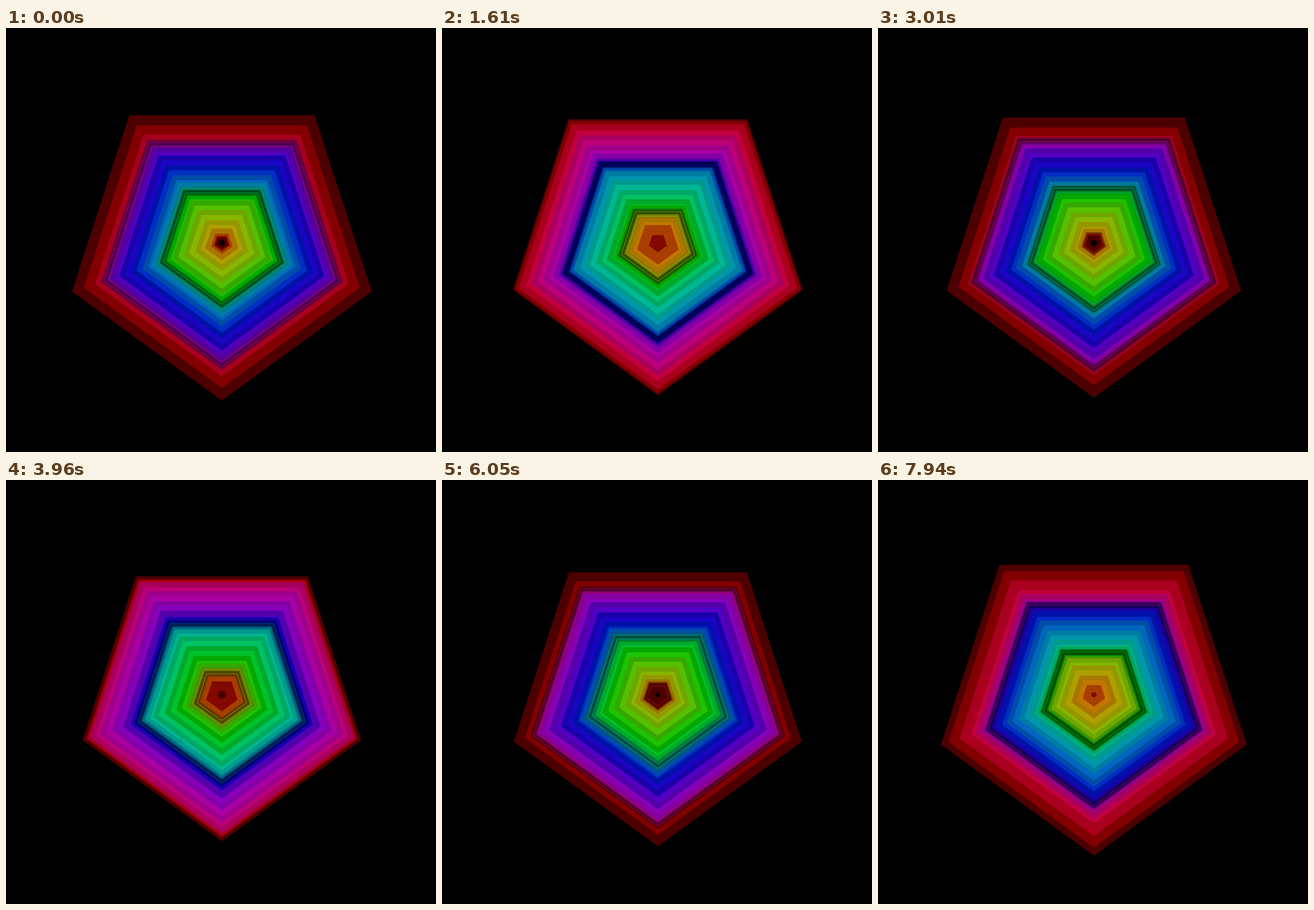
An HTML page with a canvas that plays this animation: 754x743 px, repeating every 8000 ms.

```html
<!DOCTYPE html>
<html lang="en">
<head>
<meta charset="utf-8">
<title>Pentagon wave</title>
<style>
  html, body { margin: 0; width: 100%; height: 100%; overflow: hidden; background: #000; }
  canvas { display: block; }
</style>
</head>
<body>
<canvas id="stage" width="754" height="743"></canvas>
<script>
const ctx = document.getElementById('stage').getContext('2d');
const LOOP = 8000, CX = 378.5, CY = 376.4;
const RINGS = 20, GAP = 12.5, ALPHA = 0.3;
const HALF = 15.5, SWING = 10.5;            // half line width and its swing
const START = 57, SPEED = 0.1273, LAG = 43.3; // degrees, degrees per ms, degrees per ring
const RAD = Math.PI / 180, APOTHEM = Math.cos(36 * RAD);

// [start in ms, number of even steps until the next start]
const PACE = [[0, 1], [90, 1], [240, 7], [1060, 5], [1610, 3], [1960, 7], [2780, 2],
  [3010, 5], [3600, 8], [4520, 3], [4870, 4], [5340, 6], [6050, 1], [6170, 7],
  [6990, 7], [7820, 1], [7940, 1], [LOOP, 1]];

const steps = PACE.slice(0, -1).flatMap(([from, n], i) =>
  Array.from({ length: n }, (_, k) => from + (PACE[i + 1][0] - from) * k / n));

function hueColor(hue) {
  return [0, 240, 120].map(shift => {
    const d = Math.abs((hue + shift + 180) % 360 - 180);
    return 255 * Math.min(1, Math.max(0, 2 - d / 60));
  });
}

const rings = Array.from({ length: RINGS }, (_, i) => ({
  mid: (i + 1) * GAP * APOTHEM,
  lead: (RINGS - 1 - i) * LAG,
  color: hueColor(360 * i / (RINGS - 1))
}));

// Weak channels fade out, strong ones stay
const tone = v => Math.round(v < 76 ? Math.max(0, (v - 18) * 76 / 58) : v);

function pentagon(apothem, fill) {
  const r = apothem / APOTHEM;
  ctx.beginPath();
  for (let k = 0; k < 5; k++) {
    const a = (90 + 72 * k) * RAD;
    ctx.lineTo(CX + r * Math.cos(a), CY + r * Math.sin(a));
  }
  ctx.closePath();
  ctx.fillStyle = fill;
  ctx.fill();
}

function draw(t) {
  const bands = rings.map(({ mid, lead, color }) => {
    const half = HALF + SWING * Math.cos((START + SPEED * t + lead) * RAD);
    return { inner: mid - half, outer: mid + half, color };
  });
  const edges = bands.flatMap(b => [b.inner, b.outer])
    .filter(e => e > 0).sort((a, b) => b - a);

  ctx.fillStyle = '#000';
  ctx.fillRect(0, 0, 754, 743);
  edges.forEach((edge, i) => {
    const at = (edge + (edges[i + 1] || 0)) / 2;
    let mix = [0, 0, 0];
    for (const b of bands) {
      if (at > b.inner && at < b.outer) {
        mix = mix.map((v, c) => v * (1 - ALPHA) + b.color[c] * ALPHA);
      }
    }
    pentagon(edge, `rgb(${mix.map(tone).join()})`);
  });
}

const origin = performance.now();
let shown = -1;
function tick() {
  const t = (performance.now() - origin) % LOOP;
  let now = 0;
  for (const s of steps) if (s <= t) now = s;
  if (now !== shown) draw(shown = now);
  requestAnimationFrame(tick);
}
tick();
</script>
</body>
</html>
```
